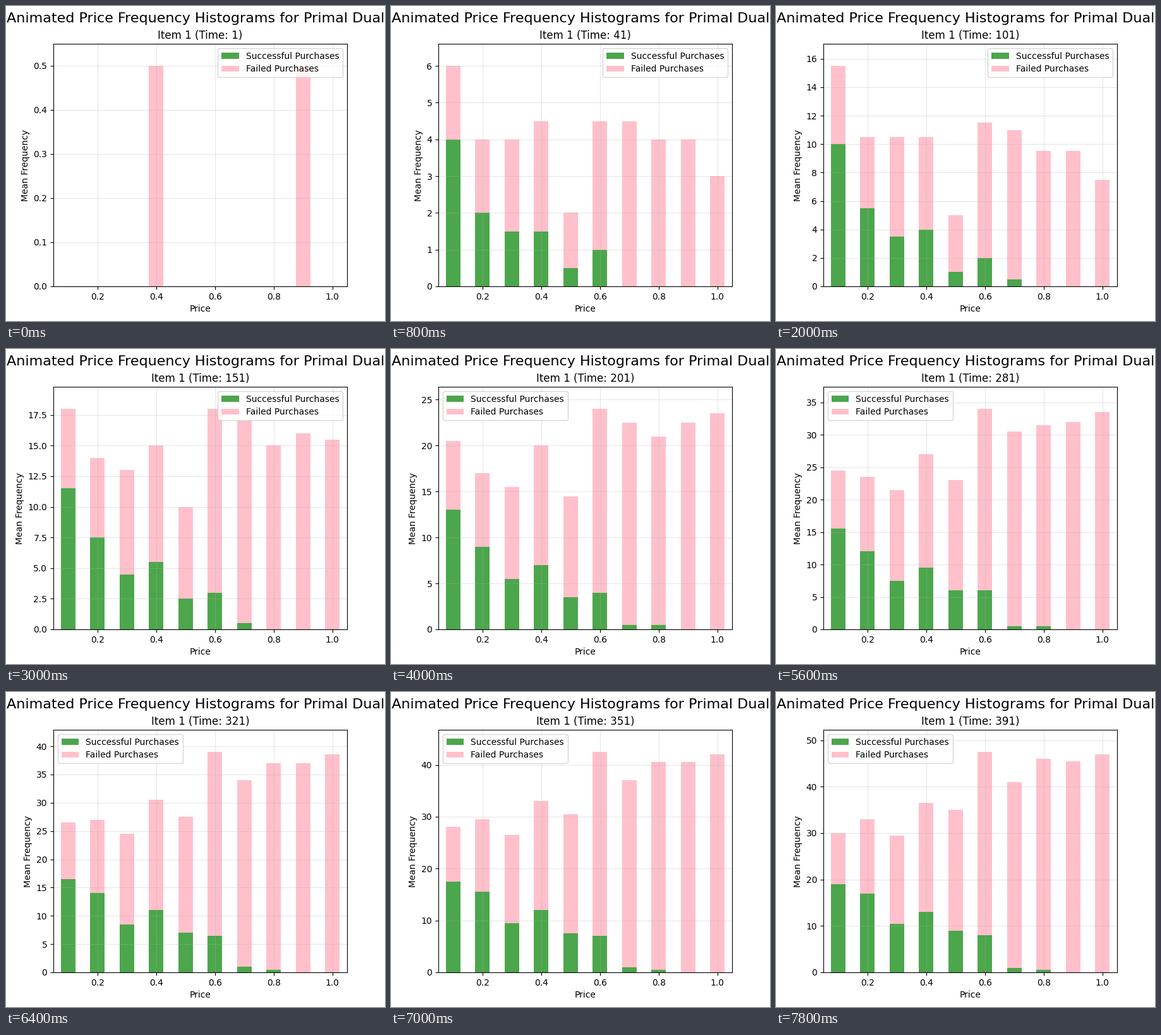
These frames come from a looping animation (600 px wide and 500 px high, 8 s). A matplotlib script:

```python
import numpy as np
import matplotlib.pyplot as plt
from matplotlib.animation import FuncAnimation

FRAMES = 40
ROUNDS = 10  # rounds per step
WIDTH = 0.05

prices = np.arange(1, 11) / 10

# Attempts per price grow at a steady rate between these key steps.
key_steps = [0, 10, 20, FRAMES - 1]
key_attempts = np.array([
    np.isin(np.arange(1, 11), [4, 9]) / 2,  # the first two picks
    [15.5, 10.5, 10.5, 10.5, 5, 11.5, 11, 9.5, 9.5, 7.5],
    [20.5, 17, 15.5, 20, 14.5, 24, 22.5, 21, 22.5, 23.5],
    [30, 33, 29.5, 36.5, 35, 47.5, 41, 46, 45.5, 47],
])
# Share of attempts that succeed; the two highest prices never sell.
share = np.array([0.63, 0.52, 0.35, 0.36, 0.25, 0.17, 0.024, 0.015, 0, 0])


def to_halves(values):
    """Counts are means of two runs, so they move in halves."""
    return np.round(np.asarray(values) * 2) / 2


def counts(step):
    total = to_halves([np.interp(step, key_steps, col) for col in key_attempts.T])
    sold = to_halves(total * share)
    return sold, total - sold


fig, ax = plt.subplots(figsize=(6, 5), dpi=100)
fig.suptitle("Animated Price Frequency Histograms for Primal Dual", fontsize=16)


def update(step):
    sold, failed = counts(step)
    ax.clear()
    ax.bar(prices, sold, WIDTH, color="green", alpha=0.7,
           label="Successful Purchases")
    ax.bar(prices, failed, WIDTH, bottom=sold, color="pink",
           label="Failed Purchases")
    ax.set_xlim(0.05, 1.05)
    ax.set_ylim(0, (sold + failed).max() * 1.1)
    ax.set_title(f"Item 1 (Time: {1 + ROUNDS * step})")
    ax.set_xlabel("Price")
    ax.set_ylabel("Mean Frequency")
    ax.grid(True, alpha=0.3)
    ax.legend(loc="best")
    return ax.patches


anim = FuncAnimation(fig, update, frames=FRAMES, interval=200,
                     repeat=True, repeat_delay=0, blit=False)
plt.show()
```
